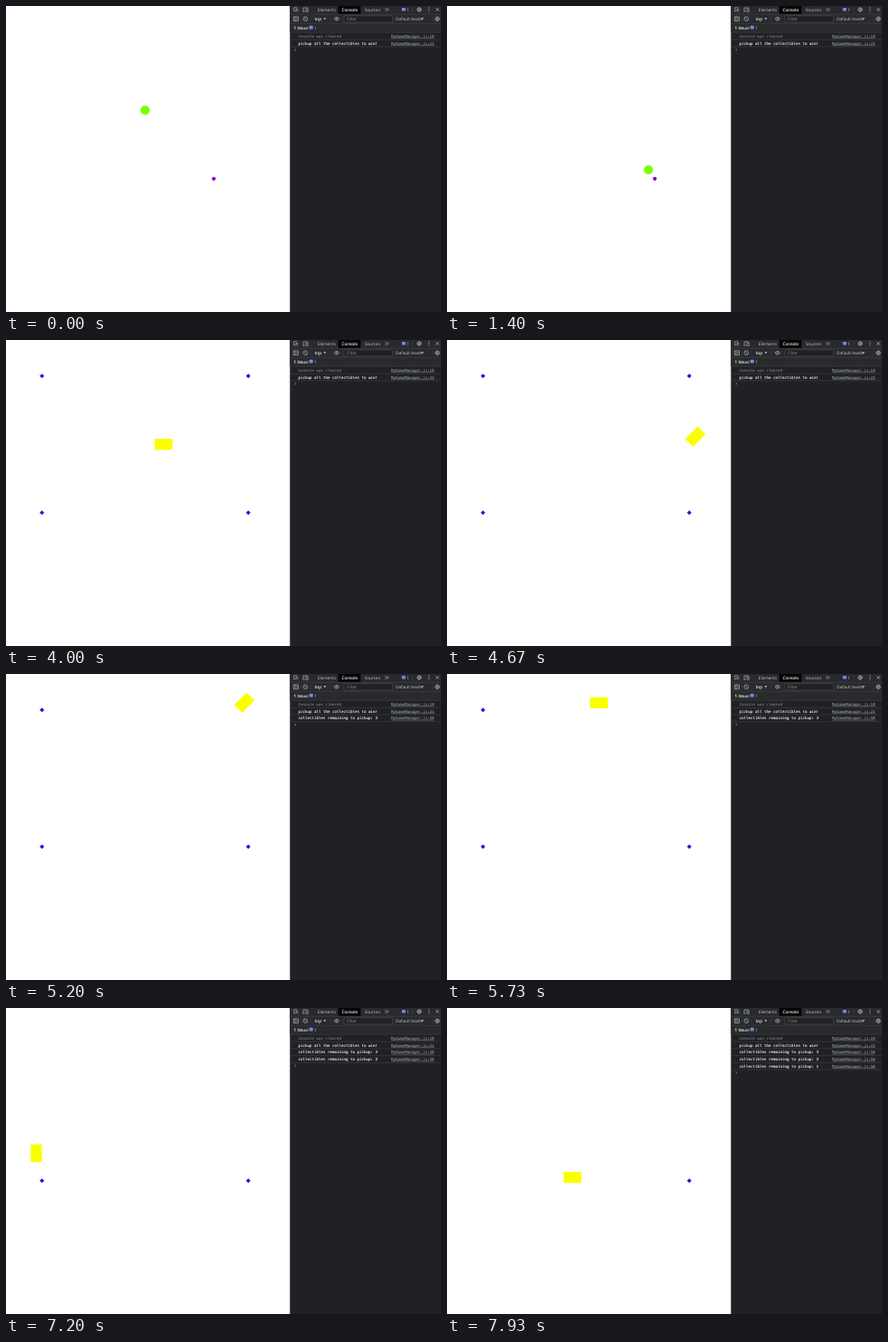
An HTML page for the animation above (8 s loop, 480 by 338 pixels).

```html
<!DOCTYPE html>
<html lang="en">
<head>
<meta charset="utf-8">
<title>Collectibles game with console</title>
<style>
  html, body { margin: 0; width: 100%; height: 100%; overflow: hidden; background: #fff; }
  svg { display: block; width: 100vw; height: 100vh; }
  text { font-family: "Open Sans", Roboto, sans-serif; font-size: 4.7px; fill: #c3c6ca; text-rendering: geometricPrecision; white-space: pre; }
  .bright { fill: #f0f1f2; stroke: #f0f1f2; stroke-width: .12; }
  .dim { fill: #8b8f94; }
  .mono text { font-family: "DejaVu Sans Mono", "Noto Sans Mono", monospace; font-size: 4.16px; }
  .mono .note { font-style: italic; fill: #94989d; }
  .mono .link { fill: #a8acb1; }
  .icon { fill: none; stroke: #a4a8ad; stroke-width: .75; }
  .rule { fill: none; stroke: #44474b; stroke-width: .5; }
  .badge { fill: #7c84e8; }
</style>
</head>
<body>
<svg viewBox="0 0 480 338" preserveAspectRatio="none">
  <rect width="480" height="338" fill="#fff"/>
  <g id="items"></g>
  <circle id="ball" r="5.1" fill="#7bff00"/>
  <rect id="box" x="-9.8" y="-6.1" width="19.6" height="12.2" fill="#faff00"/>

  <rect x="313.3" width="166.7" height="338" fill="#202124"/>
  <rect x="313.3" width="166.7" height="29" fill="#292a2d"/>
  <rect x="366.5" width="24.8" height="9" fill="#050506"/>
  <path class="rule" d="M313.3 9.2H480M313.3 19.3H480M313.3 29.2H480"/>

  <g class="icon">
    <path d="M321.5 1.8H317.7V5.8H319.2M320 3.7L322.7 6.2M320 6.2V3.7H322.5"/>
    <path d="M328 5.8V2H333M327.2 6H329.8M331 3.2H333.3V6.3H331Z"/>
    <path d="M418.3 2.2l1.7 1.8l-1.7 1.8M420.6 2.2l1.7 1.8l-1.7 1.8"/>
    <path d="M474.2 2.2l3.5 3.5m0 -3.5l-3.5 3.5"/>
    <path d="M317.3 11.9h5.2v4.7h-5.2ZM319 11.9v4.7M320.3 13.2l1.3 1l-1.3 1"/>
    <circle cx="330.3" cy="14.2" r="2.4"/>
    <path d="M328.6 12.5l3.4 3.4"/>
    <path d="M361.9 14.2q2.9 -3.7 5.8 0q-2.9 3.7 -5.8 0Z"/>
    <circle cx="364.8" cy="14.2" r=".9"/>
    <g id="gear">
      <circle cx="456" cy="3.9" r="2.3" stroke-width="1" stroke-dasharray="1.1 .7"/>
      <circle cx="456" cy="3.9" r="1.7"/>
      <circle cx="456" cy="3.9" r=".6"/>
    </g>
    <use href="#gear" x="20" y="10.3"/>
    <path d="M466.7 1.8v4.3" stroke-width="1.2" stroke-linecap="round" stroke-dasharray="0 2.1"/>
  </g>
  <path d="M350.3 13.1h3l-1.5 2.3ZM458 13.1h3l-1.5 2.3Z" fill="#a4a8ad"/>
  <path class="rule" d="M448.3 1.5V7M325.3 11.5V17M336 11.5V17M357.8 11.5V17M471 11.5V17"/>
  <rect x="373" y="10.7" width="53.6" height="7.2" rx=".6" fill="#202124" stroke="#55585d" stroke-width=".5"/>
  <rect class="badge" x="436.8" y="2" width="4" height="3.6" rx=".6"/>
  <rect class="badge" x="334.7" y="21.8" width="4" height="3.6" rx=".6"/>

  <text x="343.8" y="5.8">Elements</text>
  <text x="370.5" y="5.8" class="bright">Console</text>
  <text x="395.7" y="5.8">Sources</text>
  <text x="442.3" y="5.8">1</text>
  <text x="340.7" y="15.9" class="bright">top</text>
  <text x="376" y="15.9" class="dim">Filter</text>
  <text x="430" y="15.9">Default levels</text>
  <text x="317.6" y="25.7" class="bright">1 Issue:</text>
  <text x="340.2" y="25.7">1</text>
  <g id="log" class="mono"></g>
</svg>
<script>
const $ = id => document.getElementById(id);
const FPS = 15, TICKS = 120;
const SPAWN = { x: 153.5, y: 115.2 };
const WIN = 36, SWITCH = 51, PICKUPS = [75, 98, 110];

// Moves made by the player: [tick before the move, ticks held, dx, dy]
const ballMoves = [
  [9, 12, 68.8, 65.8], [23, 3, 24.2, 0], [29, 2, 0, 16],
  [33, 3, -18, 0], [38, 2, 0, -13]
];
const boxMoves = [
  [58, 11, 112, 0], [69, 1, 8.5, -8.5], [70, 7, 0, -81],
  [77, 1, -11, 6], [78, 19, -226, 0], [97, 1, -3.5, 8.5],
  [98, 12, 0, 144.3], [110, 1, 8.5, 2.7], [111, 8, 96.5, 0]
];

// Sums the moves so far; the box faces the nearest of eight directions.
function pose(moves, tick) {
  let { x, y } = SPAWN, angle = 0;
  for (const [from, held, dx, dy] of moves) {
    if (tick <= from) break;
    const part = Math.min(1, (tick - from) / held);
    x += dx * part;
    y += dy * part;
    angle = dx && dy ? 45 * Math.sign(dx * dy) : dy ? 90 : 0;
  }
  return `translate(${x} ${y}) rotate(${angle})`;
}

// The corners are visited counter-clockwise from the top right.
const corners = [0, 1, 2, 3].map(i => {
  const turn = (i + .5) * Math.PI / 2;
  return {
    x: 153.5 + 113.8 * Math.sign(Math.cos(turn)),
    y: 115.3 - 75.5 * Math.sign(Math.sin(turn)),
    from: SWITCH, to: PICKUPS[i] ?? TICKS
  };
});
const items = [{ x: 229.3, y: 190.8, from: 0, to: WIN, round: true }, ...corners];

const messages = [
  { from: 0, to: TICKS, line: 19, rows: ["Console was cleared"], style: "note" },
  { from: 0, to: TICKS, line: 21, rows: ["pickup all the collectibles to win!"] },
  { from: WIN, to: SWITCH, line: 54, rows: ["Great job - you found all the", "collectibles!"] },
  ...PICKUPS.map((from, i) => (
    { from, to: TICKS, line: 58, rows: ["collectibles remaining to pickup: " + (3 - i)] }))
];

const live = ({ from, to }, tick) => tick >= from && tick < to;
const show = (el, on) => { el.style.display = on ? "" : "none"; };

function logMarkup(tick) {
  let y = 34.8, out = "";
  for (const { line, rows, style = "bright" } of messages.filter(m => live(m, tick))) {
    out += `<text class="link" x="425" y="${y}">MyGameManager.js:${line}</text>` +
      `<path d="M425 ${y + .8}h47.6" stroke="#a8acb1" stroke-width=".4"/>`;
    rows.forEach((row, i) => {
      out += `<text class="${style}" x="322.5" y="${y + i * 5.3}">${row}</text>`;
    });
    y += 7.7 + (rows.length - 1) * 5.3;
    out += `<path class="rule" d="M313.5 ${y - 5.3}H480"/>`;
  }
  return out + `<path d="M318.5 ${y - 3.2}l1.5 1.3l-1.5 1.3" fill="none" stroke="#6f8fb8" stroke-width=".7"/>`;
}

$("items").innerHTML = items.map(({ x, y, round }) => round
  ? `<circle cx="${x}" cy="${y}" r="2.1" fill="#8500bd"/>`
  : `<path d="M${x} ${y - 2.5}l2.5 2.5l-2.5 2.5l-2.5 -2.5Z" fill="#4200d6"/>`).join("");
const itemEls = [...$("items").children];

let lastLog = "";
function draw(time) {
  const tick = Math.floor(time * FPS / 1000 + .1) % TICKS;
  $("ball").setAttribute("transform", pose(ballMoves, tick));
  $("box").setAttribute("transform", pose(boxMoves, tick));
  show($("ball"), tick < SWITCH);
  show($("box"), tick >= SWITCH);
  items.forEach((item, i) => show(itemEls[i], live(item, tick)));
  const log = logMarkup(tick);
  if (log !== lastLog) $("log").innerHTML = lastLog = log;
}

const start = performance.now();
function loop() {
  draw(performance.now() - start);
  requestAnimationFrame(loop);
}
loop();
</script>
</body>
</html>
```
